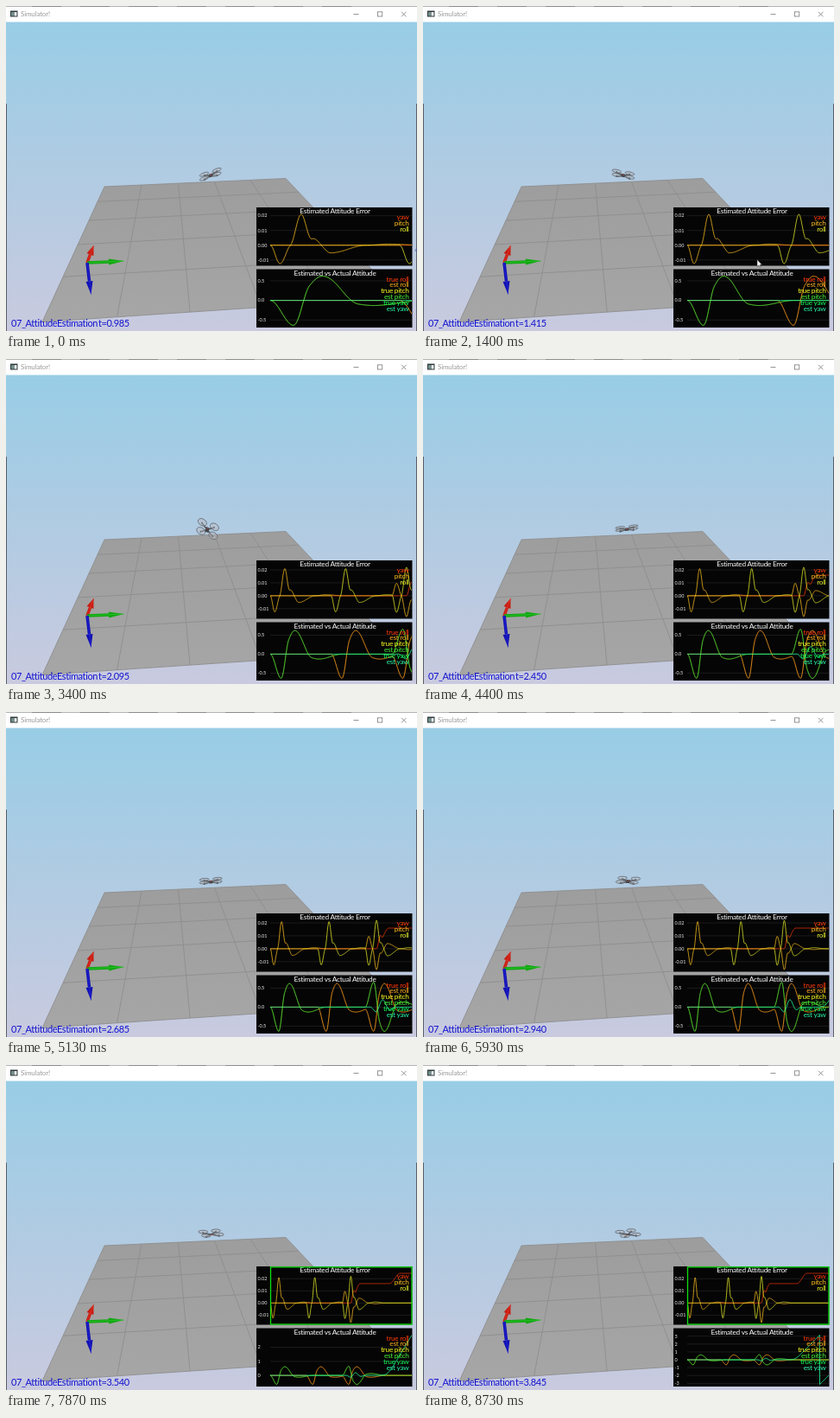
Recreate the animation shown at these times as an HTML page with a canvas. Size 476 by 376 pixels, loop 8.79 s.

```html
<!DOCTYPE html>
<html lang="en">
<head>
<meta charset="utf-8">
<title>Simulator</title>
<style>
  html, body { margin: 0; width: 100%; height: 100%; overflow: hidden; background: #fff; }
  canvas { display: block; width: 476px; height: 376px; }
</style>
</head>
<body>
<canvas id="stage" width="476" height="376"></canvas>
<script>
const ctx = document.getElementById('stage').getContext('2d');
const LOOP = 8790, STEP = LOOP / 132, DT = 0.005;
const FONT = 'Lato, "Liberation Sans", sans-serif';
const { PI, sin, cos, min, max } = Math;

// Smooth hill of height 1 at `mid`, reaching zero at mid - rise and mid + fall.
function bump(t, mid, rise, fall) {
  const u = (t - mid) / (t < mid ? rise : fall);
  return Math.abs(u) < 1 ? (1 + cos(PI * u)) / 2 : 0;
}

function ramp(t, from, to) {
  const u = min(1, max(0, (t - from) / (to - from)));
  return u * u * (3 - 2 * u);
}

// Loop time in ms to simulated seconds; the simulator runs a little unevenly.
const CLOCK = [[0, .985], [1400, 1.415], [3400, 2.095], [4400, 2.45],
  [5930, 2.94], [7000, 3.245], [8730, 3.845]];

function simTime(ms) {
  let i = 0;
  while (i < CLOCK.length - 2 && ms > CLOCK[i + 1][0]) i++;
  const [a, b] = CLOCK[i], [c, d] = CLOCK[i + 1];
  return Math.round((b + (d - b) * (ms - a) / (c - a)) / DT) * DT;
}

// One swing of the craft, and the estimator error it causes.
const swing = t => -.64 * bump(t, .165, .165, .11) + .62 * bump(t, .365, .21, .25)
  - .13 * bump(t, .72, .3, .35);
const swingError = t => -.0125 * bump(t, .068, .068, .08) + .021 * bump(t, .216, .08, .075)
  + .0045 * bump(t, .3, .07, .07) - .0052 * bump(t, .42, .08, .25) + .0008 * bump(t, .82, .15, .25);

// Pitch swings first, then roll, then both in opposite directions.
const pitch = t => swing(t) - 1.03 * swing(t - 1.8);
const roll = t => swing(t - .9) + swing(t - 1.8);
const pitchError = t => swingError(t) - .77 * swingError(t - 1.8);
const rollError = t => swingError(t - .9) + 1.05 * swingError(t - 1.8);
const yawError = t => .016 * ramp(t, 2, 2.25) + .006 * bump(t, 2.08, .06, .06)
  + .0085 * ramp(t, 2.98, 3.25);

function yaw(t) {
  const wobble = .2 * bump(t, 2.1, .25, .3) * sin((t - 2.06) * 20);
  const spin = 4.75 * .05 * Math.log(1 + Math.exp((t - 2.935) / .05));
  const a = wobble + spin;
  return a > PI ? a - 2 * PI : a;
}

function series(name, color, width, fn) {
  const data = Array.from({ length: 772 }, (_, i) => fn(i * DT));
  return { name, color, width, data };
}

const PLOTS = [
  {
    top: 233, title: 'Estimated Attitude Error', step: .01, goal: 3,
    lines: [
      series('yaw', '#ff3a08', 1, yawError),
      series('pitch', '#ffc020', 1, pitchError),
      series('roll', '#e8f028', 1, rollError)
    ]
  },
  {
    top: 304.5, title: 'Estimated vs Actual Attitude', step: .5, goal: Infinity,
    lines: [
      series('true roll', '#ff3808', .3, roll),
      series('est roll', '#ffb020', 1, t => roll(t) + rollError(t)),
      series('true pitch', '#ffff20', .3, pitch),
      series('est pitch', '#48f038', 1, t => pitch(t) + pitchError(t)),
      series('true yaw', '#10ff58', .3, yaw),
      series('est yaw', '#28f8a8', 1, yaw)
    ]
  }
];

function text(str, x, y, size, color, align = 'left', spacing = 0) {
  ctx.font = `${size}px ${FONT}`;
  ctx.letterSpacing = spacing + 'px';
  ctx.textAlign = align;
  ctx.fillStyle = color;
  ctx.fillText(str, x, y);
}

function path(points, closed) {
  ctx.beginPath();
  points.forEach(([x, y], i) => i ? ctx.lineTo(x, y) : ctx.moveTo(x, y));
  if (closed) ctx.closePath();
}

function stroke(points, color, width, closed) {
  path(points, closed);
  ctx.strokeStyle = color;
  ctx.lineWidth = width;
  ctx.stroke();
}

function fill(points, color) {
  path(points, true);
  ctx.fillStyle = color;
  ctx.fill();
}

function box(x, y, w, h, color) {
  ctx.fillStyle = color;
  ctx.fillRect(x, y, w, h);
}

function gradient(y0, y1, from, to) {
  const g = ctx.createLinearGradient(0, y0, 0, y1);
  g.addColorStop(0, from);
  g.addColorStop(1, to);
  return g;
}

// Maps the unit square to a quad in perspective.
function perspective([a, b, c, d]) {
  const dx1 = b[0] - c[0], dy1 = b[1] - c[1], dx2 = d[0] - c[0], dy2 = d[1] - c[1];
  const sx = a[0] - b[0] + c[0] - d[0], sy = a[1] - b[1] + c[1] - d[1];
  const det = dx1 * dy2 - dx2 * dy1;
  const g = (sx * dy2 - dx2 * sy) / det, h = (dx1 * sy - sx * dy1) / det;
  return (u, v) => {
    const w = g * u + h * v + 1;
    return [0, 1].map(k => (a[k] + (b[k] - a[k] + g * b[k]) * u + (d[k] - a[k] + h * d[k]) * v) / w);
  };
}

const FLOOR = [[114, 209], [324, 199.5], [455, 338], [42, 365.5]];
const ground = perspective(FLOOR);

function drawScene() {
  box(0, 18, 476, 358, gradient(18, 376, '#98cde6', '#c9cadf'));
  fill(FLOOR, gradient(200, 365, '#9d9d9d', '#a6a6a6'));
  for (let k = 0; k <= 1.01; k += .2) {
    stroke([ground(k, 0), ground(k, 1)], '#8e8e8e', .9);
    stroke([ground(0, k), ground(1, k)], '#8e8e8e', .9);
  }
}

function arrow(tip, neck, half, color, light) {
  const from = [94, 297];
  const dx = tip[0] - neck[0], dy = tip[1] - neck[1], len = Math.hypot(dx, dy);
  const nx = -dy / len * half, ny = dx / len * half;
  stroke([from, neck], color, 3.5);
  fill([[neck[0] + nx, neck[1] + ny], tip, [neck[0] - nx, neck[1] - ny]], color);
  stroke([from, tip], light, .8);
}

function drawAxes() {
  arrow([101.5, 277], [97.5, 287.5], 4.2, '#c81c12', '#e0362a');
  arrow([136.5, 295], [119, 296], 3.6, '#10a810', '#2cc02c');
  arrow([98.5, 333.5], [96.5, 318.5], 4, '#1010b4', '#2626d8');
}

function drawDrone(t) {
  const cx = 237.5 - 7 * bump(t, 1.6, .7, 1.2);
  const cy = 196 + 1.5 * bump(t, 2.1, .7, 1);
  const f = roll(t), p = -pitch(t), y = yaw(t), view = .33;
  const project = (bx, by, bz) => {
    const y1 = by * cos(f) - bz * sin(f), z1 = by * sin(f) + bz * cos(f);
    const x2 = bx * cos(p) + z1 * sin(p), z2 = z1 * cos(p) - bx * sin(p);
    const wx = x2 * cos(y) - y1 * sin(y), wy = x2 * sin(y) + y1 * cos(y);
    return [cx + wy, cy + z2 * cos(view) - wx * sin(view)];
  };
  for (const x of [7, -7]) for (const w of [-7.7, 7.7]) {
    stroke([project(0, 0, 0), project(x, w, 0)], '#55585c', 1.6);
    stroke([project(x, w, 1), project(x, w, -1.5)], '#33363a', 1.5);
    const disc = Array.from({ length: 20 }, (_, i) => {
      const a = i * PI / 10;
      return project(x + 5.4 * cos(a), w + 5.4 * sin(a), -1.5);
    });
    fill(disc, 'rgba(185,187,194,.45)');
    stroke(disc, '#686b72', .9, true);
  }
  fill([project(3, -2, -1), project(3, 2, -1), project(-3, 2, 1), project(-3, -2, 1)], '#44464a');
  const nose = project(2, 0, -.5);
  box(nose[0] - 1, nose[1] - .5, 2, 1.2, '#a05048');
}

function drawPlot({ top, title, step, goal, lines }, t) {
  const left = 306, right = 470;
  const count = Math.round(t / DT) + 1;
  const seen = lines.flatMap(({ data }) => data.slice(0, count));
  const lo = min(...seen), hi = max(...seen);
  const yOf = v => top + 8 + 57 * (hi - v) / (hi - lo);
  const tick = (hi - lo) / step > 7 ? step * 2 : step;
  const digits = tick < .1 ? 2 : tick < 1 ? 1 : 0;

  box(290, top, 180.5, 67.5, '#050505');
  for (let k = Math.ceil(lo / tick - .05); k <= hi / tick + .05; k++) {
    const y = yOf(k * tick);
    stroke([[left, y], [right, y]], '#262626', .7);
    text((k * tick).toFixed(digits), 291.5, y + 1.8, 5.5, '#f0f0f0');
  }

  ctx.save();
  ctx.beginPath();
  ctx.rect(left, top, right - left, 67.5);
  ctx.clip();
  ctx.globalAlpha = .75;
  ctx.lineJoin = 'round';
  for (const { data, color, width } of lines) {
    const points = data.slice(0, count).map((v, i) => [left + (right - left) * i * DT / t, yOf(v)]);
    stroke(points, color, width);
  }
  ctx.restore();

  text(title, 381, top + 7.2, 8.3, '#fff', 'center', -.3);
  lines.forEach(({ name, color }, i) => text(name, 466.5, top + 14 + i * 6.85, 8.3, color, 'right', -.3));
  if (t >= goal) {
    ctx.strokeStyle = '#10e010';
    ctx.lineWidth = 1.3;
    ctx.strokeRect(left + .5, top + .8, right - left - .5, 66.2);
  }
}

function drawWindow() {
  box(0, 0, 476, 18.5, '#fff');
  box(0, 0, 476, 1, '#b4b4b4');
  for (let x = 30; x < 400; x += 56) box(x, 0, 34, 1, '#8c8c8c');
  for (const x of [0, 475]) box(x, 113, 1, 263, '#5a6068');
  box(5, 5.5, 8.5, 7, '#30383c');
  box(6, 7, 3, 4.5, '#70908a');
  box(9.5, 7, 3, 4.5, '#e8eeee');
  text('Simulator!', 17, 11.8, 8, '#999', 'left', -.15);
  stroke([[402.5, 9.5], [408.5, 9.5]], '#888', .9);
  ctx.strokeRect(430.5, 6.8, 5.2, 5.2);
  stroke([[458, 6.8], [463.5, 12.3]], '#888', .9);
  stroke([[463.5, 6.8], [458, 12.3]], '#888', .9);
}

function drawPointer(ms) {
  if (ms < 600) {
    stroke([[476, 280.5], [473.8, 282.5], [476, 284.5]], '#4a62b0', .9);
    return;
  }
  if (ms > 1800) return;
  const e = ramp(ms, 600, 1000);
  const x = 476 - 89 * e, y = 283 + 10.5 * e;
  const shape = [[0, 0], [0, 8], [1.8, 6.4], [3, 9], [4.2, 8.4], [3.1, 5.9], [5.5, 5.7]]
    .map(([px, py]) => [x + px, y + py]);
  fill(shape, '#fff');
  stroke(shape, '#222', .5, true);
}

function draw(ms) {
  const t = simTime(ms);
  drawScene();
  drawAxes();
  drawDrone(t);
  for (const plot of PLOTS) drawPlot(plot, t);
  text('07_AttitudeEstimation', 6, 370.8, 11, '#1414d0', 'left', -.4);
  text('t=' + t.toFixed(3), 107, 370.8, 11, '#1414d0', 'left', -.4);
  drawWindow();
  drawPointer(ms);
}

const start = performance.now();
function tick() {
  const ms = (performance.now() - start) % LOOP;
  draw(Math.floor(ms / STEP) * STEP);
  requestAnimationFrame(tick);
}
tick();
</script>
</body>
</html>
```
